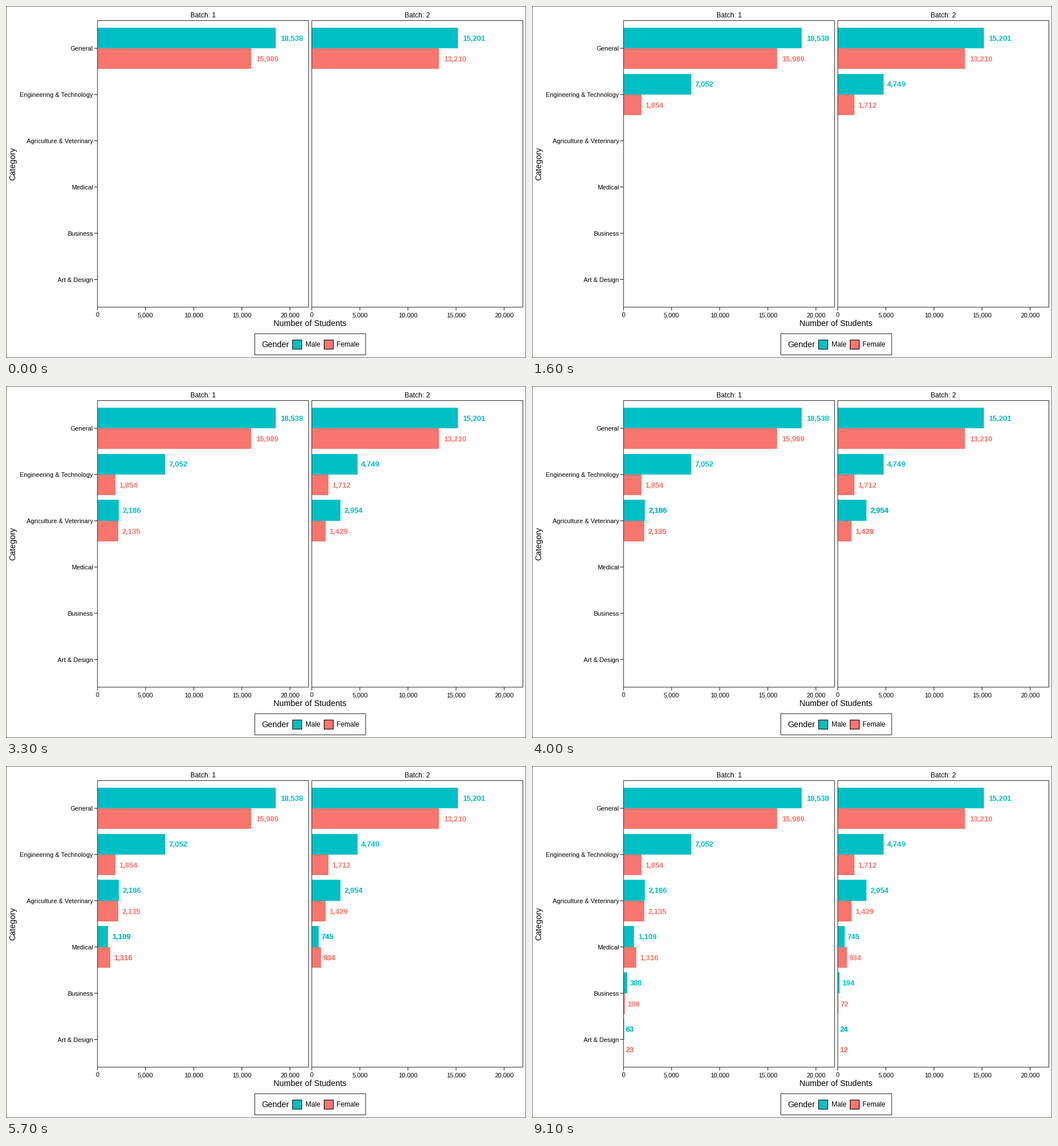
Write a matplotlib script that moves like this. It is 908 px wide and 616 px high and loops after 10 s.

```python
import matplotlib.pyplot as plt
from matplotlib.animation import FuncAnimation
from matplotlib.patches import Rectangle

W, H, DPI = 908, 616, 72          # at 72 dpi one point is one pixel
STEP, LOOP = 100, 10000           # ms
MALE, FEMALE, BORDER = "#00BFC4", "#F8766D", "#333333"

# category: (male, female) for each batch
DATA = {
    "General": ((18538, 15989), (15201, 13210)),
    "Engineering & Technology": ((7052, 1854), (4749, 1712)),
    "Agriculture & Veterinary": ((2186, 2135), (2954, 1429)),
    "Medical": ((1109, 1316), (745, 934)),
    "Business": ((388, 109), (194, 72)),
    "Art & Design": ((63, 23), (24, 12)),
}
LEFT, RIGHT, TOP, BOTTOM = 159.8, 902.5, 25.5, 527.05
GAP = 5.5
PANEL_W = (RIGHT - LEFT - GAP) / 2
PANELS = (LEFT, LEFT + PANEL_W + GAP)
UNIT = 0.0168                     # pixels per student
ROW = (BOTTOM - TOP) / 6.2
BAR_H = 0.45 * ROW
TICK = 5.67
LINE_W = 1.07
LABEL_SIZE = 13

plt.rcParams["font.family"] = "Liberation Sans"
fig = plt.figure(figsize=(W / DPI, H / DPI), dpi=DPI, facecolor="white")
ax = fig.add_axes([0, 0, 1, 1])
ax.set(xlim=(0, W), ylim=(H, 0))
ax.axis("off")


def box(x, y, w, h, fill="none", edge="none", lw=LINE_W, z=1, snap=False):
    return ax.add_patch(Rectangle((x, y), w, h, facecolor=fill, edgecolor=edge,
                                  linewidth=lw, zorder=z, snap=snap))


def line(x0, y0, x1, y1):
    ax.plot([x0, x1], [y0, y1], color="#1a1a1a", lw=LINE_W,
            solid_capstyle="butt", snap=False, zorder=3)


def text(x, y, s, size, ha="left", color="black", **kw):
    return ax.text(x, y, s, fontsize=size, ha=ha, va="baseline",
                   color=color, zorder=4, **kw)


def row_center(i):
    return TOP + (0.6 + i) * ROW


def draw_frame():
    box(0, 0, W, H, edge="black")
    for n, x0 in enumerate(PANELS, 1):
        box(x0, TOP, PANEL_W, BOTTOM - TOP, edge=BORDER, z=3)
        text(x0 + PANEL_W / 2, 20, f"Batch: {n}", 12, "center")
        for value in range(0, 20001, 5000):
            x = x0 + value * UNIT
            line(x, BOTTOM, x, BOTTOM + TICK)
            text(x, 544, f"{value:,}", 11, "center")
    for i, name in enumerate(DATA):
        y = row_center(i)
        line(LEFT - TICK, y, LEFT, y)
        text(LEFT - TICK - 2.2, y + 4, name, 11, "right")
    text(531, 560, "Number of Students", 14.2, "center")
    text(16, 276, "Category", 14.2, "center", rotation=90,
         rotation_mode="anchor")


def draw_legend():
    box(434.5, 573.5, 193.5, 37, edge=BORDER)
    text(446, 597, "Gender", 14.2)
    for x, color, name in ((500.5, MALE, "Male"), (555.5, FEMALE, "Female")):
        box(x, 584.5, 16, 16, color, "black")
        text(x + 22, 596, name, 12)


def draw_bar(x0, y, value, color):
    """Return the bar, its label and the label's overprint."""
    s = f"{value:,}"
    width = LABEL_SIZE * sum(0.278 if c == "," else 0.556 for c in s)
    end = x0 + value * UNIT
    bar = box(x0, y, end - x0, BAR_H, color, lw=0, z=2, snap=True)
    labels = [text(end + 0.2 * width, y + BAR_H / 2 + 4.7, s, LABEL_SIZE,
                   color=color, weight="bold") for _ in range(2)]
    return bar, *labels


draw_frame()
draw_legend()
rows = []
for i, batches in enumerate(DATA.values()):
    y = row_center(i)
    rows.append([draw_bar(x0, y + dy, value, color)
                 for x0, pair in zip(PANELS, batches)
                 for value, color, dy in zip(pair, (MALE, FEMALE), (-BAR_H, 0))])


def update(frame):
    # a new row every 1700 ms; its labels settle 700 ms after it appears
    current, phase = divmod(frame * STEP + 100, 1700)
    settled = phase >= 700
    for i, row in enumerate(rows):
        for bar, label, overprint in row:
            bar.set_visible(i <= current)
            label.set_visible(i <= current)
            # settled labels are printed twice, so they look heavier
            overprint.set_visible(i == current and settled)
    return []


anim = FuncAnimation(fig, update, frames=LOOP // STEP, interval=STEP,
                     repeat=True, repeat_delay=0, blit=False)
plt.show()
```
